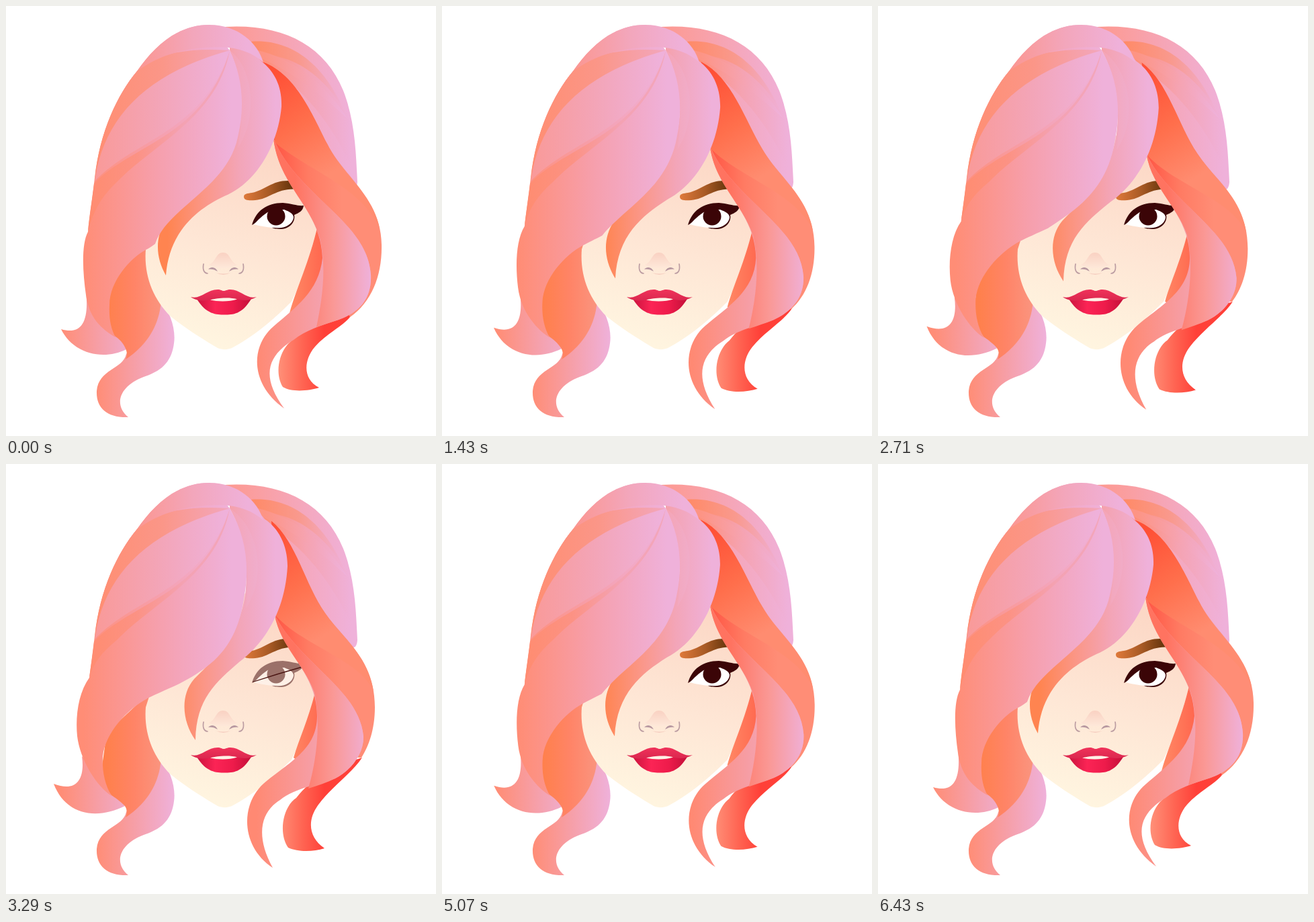
An HTML page for the animation above (7210 ms loop, 640 by 640 pixels).

```html
<!DOCTYPE html>
<html lang="en">
<head>
<meta charset="utf-8">
<title>Portrait with swaying hair</title>
<style>
html, body { margin: 0; width: 100%; height: 100%; overflow: hidden; background: #fff; }
svg { display: block; width: 100vw; height: 100vh; }
</style>
</head>
<body>
<svg id="art" viewBox="0 0 640 640" xmlns="http://www.w3.org/2000/svg"></svg>
<script>
const CORAL = '#ff8d76', LILAC = '#efb1da';
const art = document.getElementById('art');
const moving = [];
let markup = '', count = 0;

// line: gradient axis "x1 y1 x2 y2"; from/to: path at rest and fully swung
function shape(line, colors, from, to) {
  const id = count++, [x1, y1, x2, y2] = line.split(' ');
  const stops = colors.map((c, i) =>
    `<stop offset="${i / (colors.length - 1)}" stop-color="${c}"/>`).join('');
  markup += `<linearGradient id="g${id}" gradientUnits="userSpaceOnUse" x1="${x1}" y1="${y1}" x2="${x2}" y2="${y2}">${stops}</linearGradient>` +
    `<path id="p${id}" d="${from}" fill="url(#g${id})"/>`;
  if (to) moving.push({ id, from, to: to.match(/-?[\d.]+/g).map(Number) });
}

function backHair() {
  shape('330 0 515 0', ['#fd9990', LILAC],
    'M326 31C410 26 474 57 502 126C520 172 521 222 523 262C522 273 518 275 514 271L460 240L370 90Z');
  shape('366 0 508 0', ['#ff8a67', '#f9998e', LILAC],
    'M364 53C425 48 478 88 508 168C470 116 425 84 374 66Z');
  shape('378 0 515 0', ['#ff8d74', '#f5a3b2', LILAC],
    'M376 73C432 70 482 112 510 168C518 200 520 225 521 255C500 205 460 130 378 82Z');
  shape('385 0 505 0', ['#fd9484', LILAC],
    'M374 66C425 77 472 112 509 168C470 133 430 100 378 77Z');
}

function lowerLeft() {
  shape('135 0 250 0', [CORAL, '#f69fa8', LILAC],
    'M228 436C245 455 253 482 250 502C246 535 225 545 205 552C168 566 160 594 182 612C150 613 134 598 135 573C138 540 174 541 179 518Z');
  shape('82 0 178 0', [CORAL, '#f0abc9'],
    'M119 425C124 470 112 490 82 481C100 518 145 528 179 511L165 470Z',
    'M113 435C118 470 104 489 71 476C89 523 135 530 177 509L150 470Z');
  shape('150 0 232 0', ['#ff804c', '#ff8467', '#fa9580'],
    'M212 350L150 400L140 470L163 492C172 498 176 505 178 510C181 517 180 521 178 526C205 508 229 480 231 436Z',
    'M214 340L150 400L140 470L157 493C166 499 172 504 176 508C181 513 180 521 178 526C205 508 229 480 231 436Z');
}

function face() {
  shape('390 220 300 505', ['#fcd8c6', '#fee6d5', '#fff5e0'],
    'M208 362C205 400 218 435 245 462C270 482 295 497 315 509C322 512 331 512 338 508C375 488 405 460 425 440C445 400 455 360 465 325L400 180L330 200L215 340Z');

  // nose
  shape('0 366 0 390', ['#f9d0c1', '#fee8d9'],
    'M302 385C313 381 312 367 323 367C334 367 333 381 344 385C335 392 311 392 302 385Z');
  markup += `<g fill="none" stroke="#bc9da2" stroke-width="1.700" stroke-linecap="round">
    <path d="M294 384C292 394 296 398 300 398M353 384C355 394 351 398 347 398"/></g>
    <path fill="#b798a0" d="M301 392C305 387 312 388 315 395C310 392 306 391 301 392ZM346 392C342 387 335 388 332 395C337 392 341 391 346 392Z"/>
    <path fill="#f5cdbf" d="M313 397Q323 403 334 397Q323 400 313 397Z"/>`;

  // lips
  shape('285 0 364 0', ['#cc143f', '#fb2455', '#ee1b4b', '#c5103a'],
    'M284 436C298 459 313 459.500 325 459.500C338 459.500 351 459 365 436L325 434Z');
  shape('0 422 0 438', ['#f0325a', '#db284f'],
    'M275 433C290 437 299 422 315 422C320 422 321 424 324 424C327 424 329 422 334 422C349 422 358 437 373 433C362 440 350 438 341 436C330 434 318 434 307 437C297 439 284 440 275 433Z');
  markup += '<path fill="#fff1e6" d="M304 437.500C315 434 335 433.500 344 436.500C334 440 316 440.500 304 437.500Z"/>';

  // brow
  shape('354 0 430 0', ['#df793a', '#a85a25', '#5d3009'],
    'M354 284C354 279 360 279 366 278C386 274 395 260 420 260L433 262L436 273C405 269 393 287 371 289C361 290 354 289 354 284Z');

  // eye
  markup += `<g id="open">
    <path fill="#3b0507" d="M366 326C372 305 388 293 412 293C426 294 434 298 443 297C442 305 436 308 429 311C431 320 424 331 410 332C402 332 398 331 396 330L392 310C385 312 374 322 366 326Z"/>
    <path fill="#fff" d="M369 325C379 314 386 309 391 306L414 303C422 306 427 309 428 314C428 321 420 329 410 330C396 331 380 328 369 325Z"/>
    <circle cx="402" cy="313" r="13.500" fill="#3b0507"/></g>
    <path id="shut" fill="none" stroke="#4a1512" stroke-width="1.300" d="M367 324.500Q405 312 441 302"/>`;
}

function rightHair() {
  shape('422 0 470 0', ['#ff8a66', '#ff684f'],
    'M464 326C452 380 432 420 422 457L450 465L485 400L469 345Z',
    'M460 340C450 380 436 410 428 437L450 455L480 390L464 358Z');
  shape('408 0 474 0', [CORAL, '#ff6553', '#ff4038'],
    'M514 460C480 455 440 475 424 499C405 515 400 548 412 567C425 575 450 573 466 568C440 555 444 525 460 507C480 485 505 475 514 460Z',
    'M530 437C490 450 460 462 432 497C412 510 405 550 420 571C435 578 458 577 474 572C450 555 448 530 465 507C485 480 515 460 530 437Z');
  shape('400 0 500 0', ['#ff5644', '#ff7b63', CORAL],
    'M378 82C430 98 455 160 478 205C503 255 558 285 559 355C560 400 545 440 512 463C500 440 500 420 500 400C500 320 435 285 398 197Z',
    'M395 85C432 115 445 180 475 222C503 262 549 290 549 362C549 395 540 420 529 437C510 437 500 425 500 405C500 335 440 300 400 225Z');
  shape('400 100 490 245', ['#ff5036', '#ff6f4c', '#ff8c70'],
    'M378 82C430 98 455 160 478 205C503 255 546 280 556 331C530 270 450 245 400 203L400 140Z',
    'M395 85C432 115 445 180 475 222C503 262 538 284 547 338C525 290 440 270 400 224L408 155Z');
  shape('372 0 475 0', ['#ff8973', '#f4a2b0'],
    'M398 197C435 285 538 320 543 400C545 440 520 458 495 467C470 475 445 483 428 497C390 520 378 550 414 599C365 565 362 508 398 477C430 449 466 425 471 375C468 300 408 275 398 197Z',
    'M400 225C440 300 525 335 532 405C533 430 515 455 490 468C470 476 430 482 408 500C380 517 370 552 397 601C350 570 348 508 383 476C422 443 463 425 463 375C463 310 410 280 400 225Z');
  shape('430 0 543 0', ['#ff7360', '#fa9895', LILAC],
    'M398 197C435 285 538 320 543 400C545 440 520 458 495 467C484 471 473 474 462 478C470 440 478 390 467 345C450 290 405 260 398 197Z',
    'M400 225C440 300 525 335 532 405C533 430 515 455 490 468C478 474 465 478 450 483C460 450 470 390 459 340C445 300 408 270 400 225Z');
}

function fringe() {
  shape('240 0 402 0', ['#ff8450', '#fb9686', '#f3a5b8', LILAC],
    'M333 52C345 52 372 72 380 82C400 98 411 120 410 150C405 205 375 262 325 283C285 302 243 335 238 401C223 375 221 345 238 318C262 285 345 240 350 150C352 120 345 95 333 66Z',
    'M333 52C360 52 380 75 385 82C405 95 419 120 419 152C415 225 380 270 348 294C312 325 283 350 282 411C263 385 258 345 280 320C310 290 352 250 357 185C360 140 350 95 333 66Z');
  shape('330 0 375 0', ['#f5a4b4', '#f0adcc'],
    'M333 66C368 92 376 165 345 212C353 170 354 110 333 66Z',
    'M333 66C378 95 388 170 357 215C363 170 360 110 333 66Z');
  shape('115 0 335 0', [CORAL, '#f69fac', LILAC],
    'M303 28C255 28 221 60 195 97C165 133 138 190 131 265C128 290 124 315 122 336C112 355 114 395 119 430C124 470 150 485 163 493C156 480 153 465 154 445C154 410 185 375 208 363C214 360 218 357 222 354C240 300 330 270 345 195C356 150 352 105 333 66Z',
    'M303 28C255 28 221 60 195 97C165 133 138 190 131 265C129 285 126 302 124 318C108 340 103 375 106 405C110 440 135 480 157 494C146 475 143 455 144 435C148 400 180 365 212 348C222 343 240 335 258 327C310 300 345 270 355 195C363 150 356 105 333 66Z');
  // strands over the crown
  shape('124 0 335 0', ['#ff8c70', '#fc9284', '#f4a2b3', '#f3a6bb'],
    'M333 66C315 165 220 205 165 262C143 283 131 302 122 336C124 312 128 290 131 264C190 204 295 195 333 66Z',
    'M333 66C315 165 220 205 165 262C143 280 130 296 124 318C126 304 128 288 131 264C190 204 295 195 333 66Z');
  shape('135 0 325 0', ['#f99a99', '#f3a5b8', LILAC],
    'M333 66C278 72 225 68 195 97C165 133 139 190 132 261C190 198 292 190 333 66Z');
  shape('135 0 330 0', ['#ff8e72', '#fb9688', '#f3a6bb'],
    'M333 66C278 62 225 68 195 97C165 133 138 190 132 261C145 165 210 100 333 66Z');
  shape('195 0 360 0', ['#fb9690', '#f3a6bb', LILAC],
    'M195 97C221 60 255 28 303 28C345 28 375 55 383 84C368 70 347 62 320 61C270 60 228 73 195 97Z');
}

backHair();
lowerLeft();
face();
rightHair();
fringe();
art.innerHTML = markup;

for (const m of moving) m.el = document.getElementById('p' + m.id);
const openEye = document.getElementById('open'), shutEye = document.getElementById('shut');

const LOOP = 7210, STEP = 1000 / 14;
const start = performance.now();

function pose(t) {
  const n = Math.floor((t + 5) / STEP);
  const k = Math.max(0, Math.min(n, 90 - n, 44)) / 44;
  for (const m of moving) {
    let i = 0;
    m.el.setAttribute('d', m.from.replace(/-?[\d.]+/g, a => (+a + (m.to[i++] - a) * k).toFixed(2)));
  }
  // brief blink: half, closed, half
  const lid = Math.max(0, 1 - Math.abs(n - 47) / 2);
  openEye.setAttribute('opacity', 1 - lid);
  shutEye.setAttribute('opacity', lid > 0 ? 1 : 0);
}

function tick(now) {
  pose(Math.max(0, now - start) % LOOP);
  requestAnimationFrame(tick);
}
pose(0);
requestAnimationFrame(tick);
</script>
</body>
</html>
```
